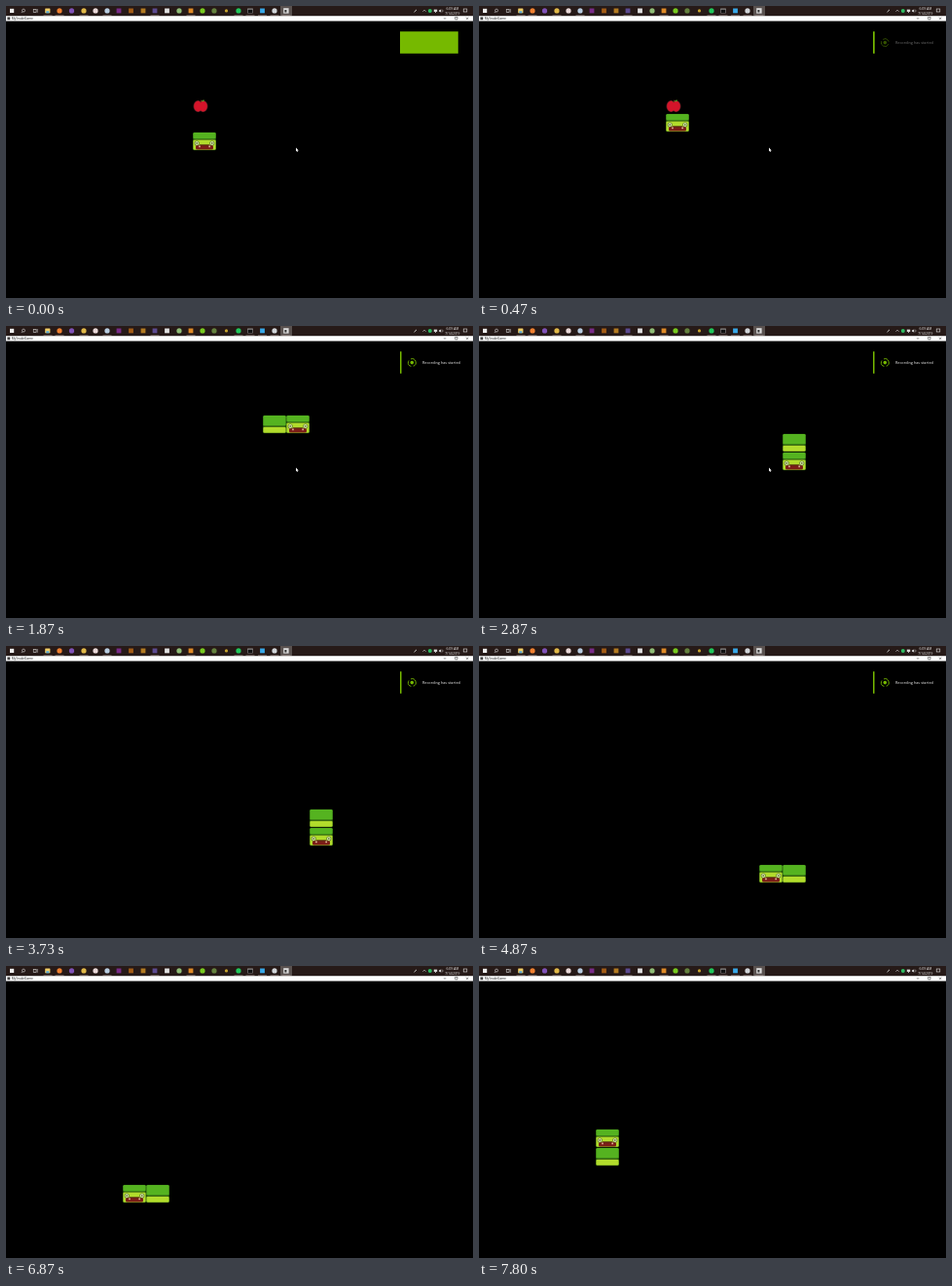
These frames come from a looping animation (480x300 px, 8 s). An HTML page with a canvas:

```html
<!DOCTYPE html>
<html lang="en">
<head>
<meta charset="utf-8">
<title>Snake game</title>
<style>
html, body { margin: 0; width: 100%; height: 100%; overflow: hidden; background: #000; }
canvas { display: block; width: 480px; height: 300px; }
</style>
</head>
<body>
<canvas id="stage"></canvas>
<script>
const LOOP = 8000, CELL_W = 24, CELL_H = 19;
const GREEN = '#76b900', LIME = '#b2dc2c', LEAF = '#55b320', BAR = '#261a18';
const canvas = document.getElementById('stage');
const scale = window.devicePixelRatio || 1;
canvas.width = 480 * scale;
canvas.height = 300 * scale;
const ctx = canvas.getContext('2d');
ctx.scale(scale, scale);

// One letter and one time per move of the snake.
const moves = 'UURRRRRDDDDDDDLLLLLLLLUUU';
const times = [270, 600, 930, 1270, 1530, 1870, 2130, 2470, 2800, 3070, 3400, 3730, 4070,
  4400, 4670, 4930, 5330, 5600, 5930, 6200, 6530, 6870, 7130, 7470, 7800];
const steps = { U: [0, -1], D: [0, 1], L: [-1, 0], R: [1, 0] };
const EATEN = 2;
const path = [[192, 129.7]];
for (const m of moves) {
  const [x, y] = path[path.length - 1], [dx, dy] = steps[m];
  path.push([x + dx * CELL_W, y + dy * CELL_H]);
}

const clamp = v => Math.max(0, Math.min(1, v));
const progress = (t, from, to) => clamp((t - from) / (to - from));
const easeOut = p => 1 - (1 - p) ** 2;

function rect(x, y, w, h, color) {
  ctx.fillStyle = color;
  ctx.fillRect(x, y, w, h);
}
function round(x, y, w, h, r, color) {
  ctx.fillStyle = color;
  ctx.beginPath();
  ctx.roundRect(x, y, w, h, r);
  ctx.fill();
}
function disc(x, y, r, color) {
  ctx.fillStyle = color;
  ctx.beginPath();
  ctx.arc(x, y, r, 0, Math.PI * 2);
  ctx.fill();
}
function arc(x, y, r, from, to, color, width) {
  ctx.strokeStyle = color;
  ctx.lineWidth = width;
  ctx.beginPath();
  ctx.arc(x, y, r, from, to);
  ctx.stroke();
}
function line(points, color, width) {
  ctx.strokeStyle = color;
  ctx.lineWidth = width;
  ctx.beginPath();
  points.forEach(([x, y]) => ctx.lineTo(x, y));
  ctx.stroke();
}
function shape(points, color) {
  ctx.fillStyle = color;
  ctx.beginPath();
  points.forEach(([x, y]) => ctx.lineTo(x, y));
  ctx.fill();
}
function text(str, x, y, size, color, align = 'left') {
  ctx.font = `${size}px "Open Sans", sans-serif`;
  ctx.textAlign = align;
  ctx.fillStyle = color;
  ctx.fillText(str, x, y);
}

// App tiles: centre, colour, kind (c = circle, s = square).
const apps = [
  [67.5, '#8052b8', 'c'], [55, '#f08030', 'c'], [80, '#e0b848', 'c'], [92, '#e8d8d8', 'c'],
  [104, '#b8cce0', 'c'], [116, '#792b88', 's'], [128.5, '#a35c16', 's'], [141, '#b27a22', 's'],
  [153, '#5d4b91', 's'], [165.5, '#e0e0e0', 's'], [178, '#8fbd76', 'c'], [190, '#df8a27', 's'],
  [202, '#76c91f', 'c'], [214, '#64813e', 'c'], [226.5, '#c7a42e', 'c'], [239, '#20c65b', 'c'],
  [263.5, '#38a8e8', 's'], [276, '#d0d4d8', 'c']
];

function drawTaskbar() {
  rect(0, 0, 480, 10.2, BAR);
  rect(282, 0, 12, 10.2, '#5a5250');
  rect(4, 2.8, 4.2, 4.2, '#eee');
  arc(18, 4.6, 1.5, 0, 7, '#ddd', .6);
  line([[17, 5.7], [15.8, 7]], '#ddd', .6);
  ctx.strokeStyle = '#ddd';
  ctx.lineWidth = .6;
  ctx.strokeRect(28.2, 3.3, 2.8, 3.2);
  line([[32.2, 3], [32.2, 6.8]], '#ddd', .6);
  round(40.2, 2.6, 5.2, 4.7, .5, '#f1ce67');
  rect(41.3, 5.2, 3, 2.1, '#58a9d8');
  for (const [x, color, kind] of apps) {
    if (kind === 'c') disc(x, 4.9, x === 226.5 ? 1.6 : 2.6, color);
    else rect(x - 2.4, 2.5, 4.8, 4.8, color);
  }
  rect(248.2, 2.6, 5.6, 4.7, '#aaa');
  rect(248.6, 3.6, 4.8, 3.4, '#111');
  rect(285.2, 2.2, 5.4, 5.4, '#ddd');
  rect(286.4, 4, 2, 2.5, '#333');
  for (const x of [43, 55, 80, 104, 153, 190, 239, 251, 263.5, 276, 288])
    rect(x - 4.5, 9.5, 9, .7, '#9b8a85');
  line([[419.5, 6.2], [422, 3.8]], '#ddd', .9);
  line([[428.4, 5.6], [430, 4.2], [431.6, 5.6]], '#ddd', .6);
  disc(435.8, 5, 2, '#2fbd63');
  rect(439.8, 3.6, 3.4, 2.3, '#ddd');
  rect(441, 6, 1, .8, '#ddd');
  shape([[445, 4.3], [446, 4.3], [447.2, 3.2], [447.2, 6.8], [446, 5.7], [445, 5.7]], '#ddd');
  arc(447.2, 5, 1.8, -.8, .8, '#ddd', .5);
  text('6:09 AM', 458.8, 4.2, 3.4, '#eee', 'center');
  text('7/14/2019', 458.8, 8.8, 3.2, '#eee', 'center');
  ctx.strokeStyle = '#ddd';
  ctx.lineWidth = .6;
  ctx.strokeRect(470.2, 3, 3.6, 3);
}

function drawTitleBar() {
  rect(0, 10.2, 480, 5.3, '#fff');
  rect(1.4, 11.4, 2.8, 2.8, '#444');
  text('MySnakeGame', 5.7, 14.1, 3.2, '#222');
  line([[449.8, 12.9], [452.3, 12.9]], '#333', .5);
  ctx.strokeStyle = '#333';
  ctx.lineWidth = .5;
  ctx.strokeRect(461.8, 11.7, 2.2, 2.2);
  line([[473, 11.7], [475.2, 13.9]], '#333', .5);
  line([[475.2, 11.7], [473, 13.9]], '#333', .5);
}

function drawApple() {
  ctx.save();
  ctx.translate(200, 103);
  for (const [grow, color] of [[.7, '#5a2024'], [0, '#d4142a']]) {
    ctx.fillStyle = color;
    ctx.beginPath();
    ctx.ellipse(-2.6, 0, 4.2 + grow, 5.4 + grow, 0, 0, Math.PI * 2);
    ctx.ellipse(2.6, 0, 4.2 + grow, 5.4 + grow, 0, 0, Math.PI * 2);
    ctx.fill();
  }
  line([[0, -3.8], [.8, -6.5]], '#5b3518', 1);
  shape([[1, -5], [2.4, -6.5], [4.2, -6.2], [3, -4.8]], '#4d9d25');
  ctx.restore();
}

function drawBody([x, y]) {
  round(x, y, 24, 18.5, 1.5, '#214d0b');
  round(x + .4, y + .3, 23.2, 10.6, 1.3, LEAF);
  round(x + .4, y + 12, 23.2, 6.1, 1.3, LIME);
}

function drawHead([x, y]) {
  round(x, y, 24, 18.5, 1.5, '#214d0b');
  round(x + .4, y + .3, 23.2, 6.4, 1.3, LEAF);
  round(x + .4, y + 7.8, 23.2, 10.3, 1.3, LIME);
  round(x + 3, y + 13, 18, 4.9, 1.6, '#7c1d18');
  rect(x + 7, y + 12.7, 10, 1, '#4b2b10');
  for (const ex of [4.2, 19.8]) {
    disc(x + ex, y + 11.3, 2.5, '#58782b');
    disc(x + ex, y + 11.3, 1.9, '#d5e5a0');
    disc(x + ex, y + 11.3, .8, '#425323');
  }
  for (const tx of [6.2, 16.4]) rect(x + tx, y + 13.8, 1.5, 1.7, '#e5c4a0');
}

function drawCursor() {
  shape([[298, 145.5], [298, 149.6], [298.9, 148.8], [299.6, 150.1], [300.2, 149.8],
    [299.6, 148.5], [300.8, 148.4]], '#f4f4f4');
}

function drawBanner(t) {
  if (t >= 6200) return;
  const top = 26.2, height = 22.6, left = 405, edge = 480;
  const closing = t >= 5600;
  if (t < 5800) {
    ctx.globalAlpha = progress(t, 250, 750);
    text('Recording has started', 428, 39.2, 3.84, '#f4f4f4');
    const turn = (1 - easeOut(progress(t, 300, 1130))) * -Math.PI * 2;
    disc(417.3, 37.6, 1.8, GREEN);
    arc(417.3, 37.6, 3.9, turn - 1.9, turn + 1.2, GREEN, .9);
    arc(417.3, 37.6, 3.9, turn + 1.8, turn + 3.7, GREEN, .9);
    ctx.globalAlpha = 1;
  }
  let from = left, to;
  if (closing) {
    to = 406.5 + (edge - 406.5) * easeOut(progress(t, 5570, 5780));
    from = left + (edge - left) * progress(t, 5790, 6190) ** 1.6;
  } else {
    to = 465 - 58.5 * easeOut(progress(t, 0, 500));
  }
  rect(from, top, Math.max(0, to - from), height, GREEN);
}

function draw(t) {
  rect(0, 0, 480, 300, '#000');
  drawTaskbar();
  drawTitleBar();
  const step = times.filter(at => at <= t).length;
  if (step < EATEN) drawApple();
  if (step > EATEN) drawBody(path[step - 1]);
  drawHead(path[step]);
  if (t < 3400) drawCursor();
  drawBanner(t);
}

const start = performance.now();
function tick() {
  draw((performance.now() - start) % LOOP);
  requestAnimationFrame(tick);
}
tick();
</script>
</body>
</html>
```
